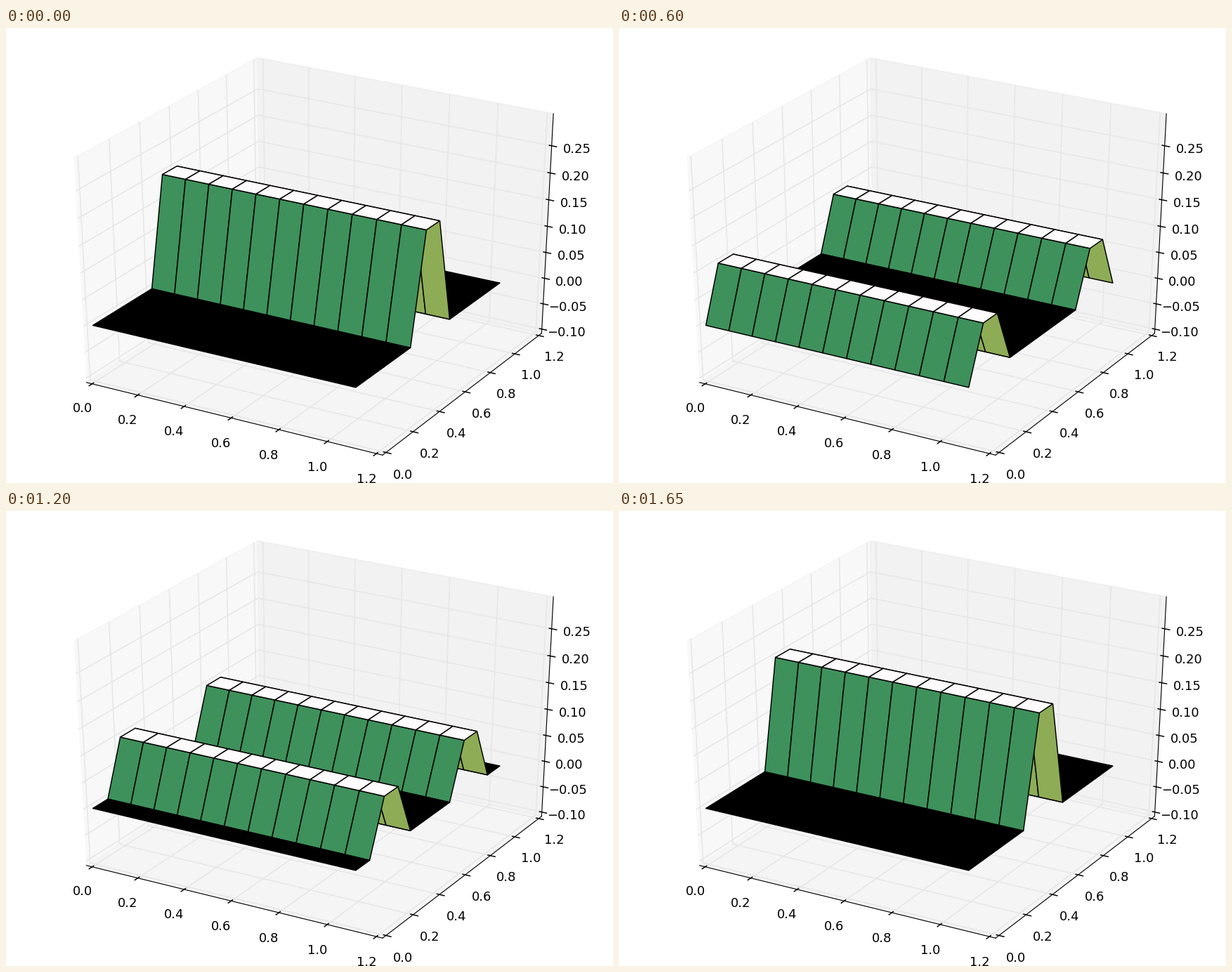
Recreate the animation shown at these times as a matplotlib script. Size 864 px wide and 648 px high, loop 1800 ms.

```python
import matplotlib.pyplot as plt
import numpy as np
from matplotlib.animation import FuncAnimation
from matplotlib.collections import LineCollection, PolyCollection
from matplotlib.patches import Polygon

STEPS, STEP_MS = 12, 150
LO, HI = np.array([0, 0, -0.1]), np.array([1.2, 1.2, 0.3])
DELTA = 1 / 12                       # axis spacing unit in the unit cube
NEAR, FAR = -DELTA / 4, 1 + DELTA / 4
DIST, ELEV, AZIM = 10, np.radians(30), np.radians(-60)

plt.rcParams["font.family"] = "DejaVu Sans"
plt.rcParams["font.size"] = 12


def project(pts):
    """Perspective view of unit-cube points: screen x, screen y, depth."""
    p = np.asarray(pts, float) - 0.5
    ce, se, ca, sa = np.cos(ELEV), np.sin(ELEV), np.cos(AZIM), np.sin(AZIM)
    right = np.array([-sa, ca, 0])
    up = np.array([-se * ca, -se * sa, ce])
    toward = np.array([ce * ca, ce * sa, se])
    w = DIST - p @ toward
    return np.stack([p @ right / w, p @ up / w, -DIST / w], axis=-1)


def flat(pts):
    return project(pts)[..., :2]


fig = plt.figure(figsize=(8, 6), dpi=108, facecolor="white")
ax = fig.add_axes([0, 0, 1, 1])
ax.set_xlim(-0.95 / DIST, 0.9 / DIST)
ax.set_ylim(-0.95 / DIST, 0.9 / DIST)
ax.set_autoscale_on(False)
ax.axis("off")


def draw_pane(corners, grey):
    ax.add_patch(Polygon(flat(corners), closed=False, fc=str(grey), ec=str(grey),
                         alpha=0.5, lw=1, zorder=1))


def draw_axis(i, base, tick_dir, ticks, fmt):
    """Axis line along dimension i, with its grid, tick marks and labels."""
    base = np.array(base, float)
    ends = np.array([base, base])
    ends[:, i] = NEAR, FAR
    ax.plot(*flat(ends).T, color="black", lw=0.75, zorder=3)

    away = np.where(base > 0.5, 1.0, -1.0)
    away[i] = 0
    grid = []
    for value in ticks:
        loc = (value - LO[i]) / (HI[i] - LO[i])

        corner = np.array([NEAR, FAR, NEAR])
        corner[i] = loc
        path = np.array([corner] * 3)
        for row, k in ((0, (i + 1) % 3), (2, (i + 2) % 3)):
            path[row, k] = NEAR + FAR - corner[k]
        grid.append(flat(path))

        pos = base.copy()
        pos[i] = loc
        mark = np.array([pos, pos])
        mark[:, tick_dir] += away[tick_dir] * DELTA * np.array([-0.1, 0.2])
        ax.plot(*flat(mark).T, color="black", lw=1, zorder=3)

        x, y = flat(pos + 0.7 * DELTA * away)
        text = fmt.format(value).replace("-", "\u2212")
        ax.text(x, y, text, ha="center", va="top", zorder=3)
    ax.add_collection(LineCollection(grid, colors="0.9", linewidths=1, zorder=2),
                      autolim=False)


N, F = NEAR, FAR
draw_pane([(N, N, N), (N, F, N), (N, F, F), (N, N, F)], 0.95)
draw_pane([(N, F, N), (F, F, N), (F, F, F), (N, F, F)], 0.90)
draw_pane([(N, N, N), (F, N, N), (F, F, N), (N, F, N)], 0.925)

fifths = np.arange(7) * 0.2
draw_axis(0, (0, N, N), 1, fifths, "{:.1f}")
draw_axis(1, (F, 0, N), 0, fifths, "{:.1f}")
draw_axis(2, (F, F, 0), 0, np.arange(-2, 6) * 0.05, "{:.2f}")


def neighbours(u):
    """Sum of both neighbours, with free (reflecting) ends."""
    p = np.pad(u, 1, mode="reflect")
    return p[:-2] + p[2:]


def simulate():
    """Leapfrog wave equation at unit Courant number."""
    u = np.zeros(12)
    u[5:7] = 0.2
    states = [u, neighbours(u) / 2]
    while len(states) < STEPS:
        states.append(np.round(neighbours(states[-1]) - states[-2], 9))
    return states


waves = simulate()
X, Y = np.meshgrid(np.arange(12) * 0.1, np.arange(12) * 0.1)

surface = PolyCollection([], cmap="gist_earth", edgecolors="black",
                         linewidths=1, zorder=4)
ax.add_collection(surface, autolim=False)


def update(n):
    Z = np.repeat(waves[n][:, None], 12, axis=1)
    pts = np.stack([X, Y, Z], axis=-1)
    # closed quads: the first corner also counts as the last
    a, b, c, d = pts[:-1, :-1], pts[:-1, 1:], pts[1:, 1:], pts[1:, :-1]
    quads = np.stack([a, b, c, d, a], axis=2).reshape(-1, 5, 3)
    level = quads[..., 2].mean(axis=1)
    view = project((quads - LO) / (HI - LO))
    order = np.argsort(-view[..., 2].mean(axis=1), kind="stable")
    surface.set_verts(view[order, :4, :2])
    surface.set_array(level[order])
    surface.set_clim(level.min(), level.max())
    return [surface]


anim = FuncAnimation(fig, update, frames=STEPS, interval=STEP_MS,
                     repeat=True, repeat_delay=0, blit=False)
plt.show()
```
